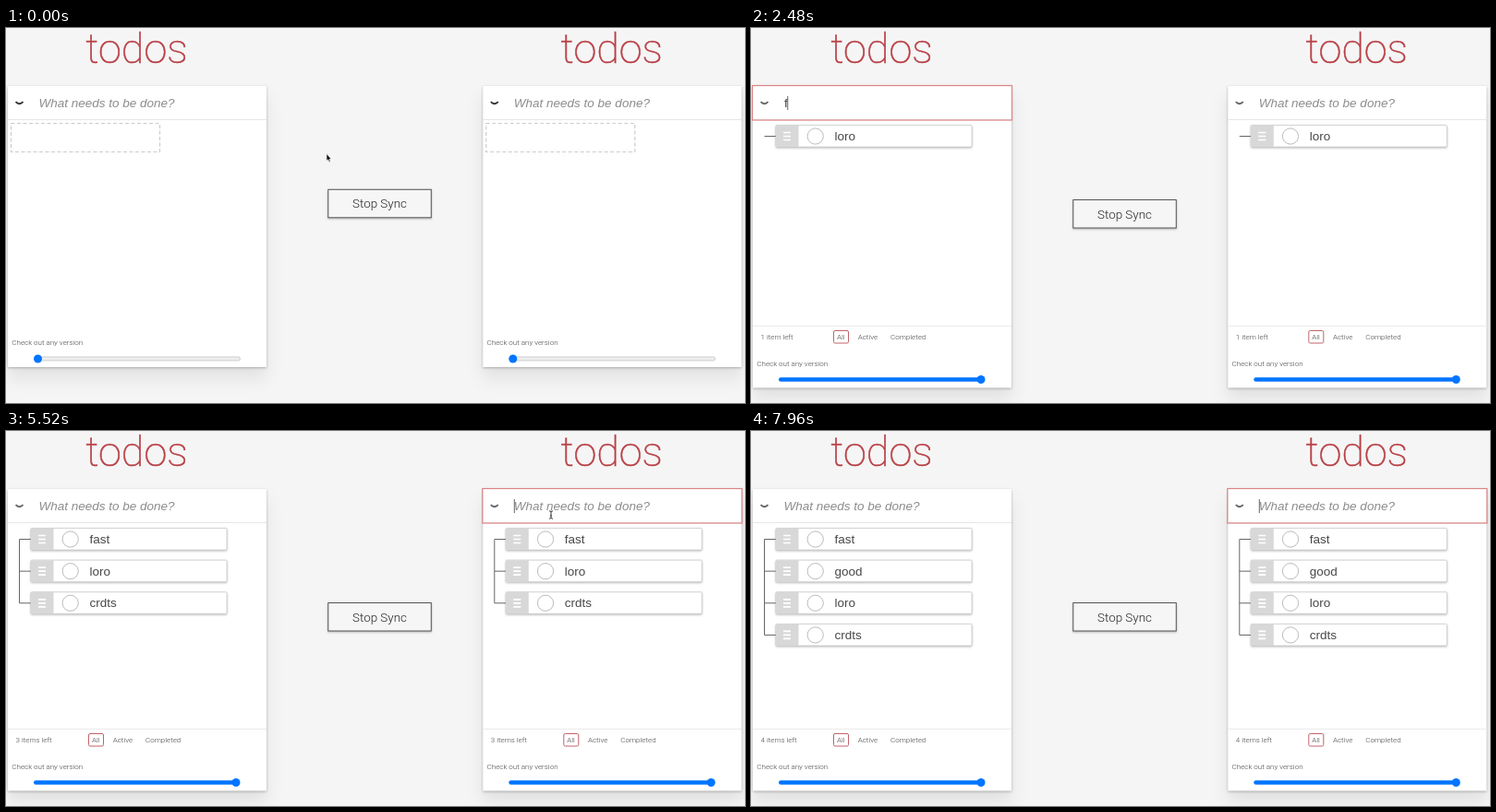
Recreate the animation shown at these times as an HTML page. Size 800 by 407 pixels, loop 8 s.

```html
<!DOCTYPE html>
<html lang="en">
<head>
<meta charset="utf-8">
<title>todos</title>
<style>
  html, body { margin: 0; width: 100%; height: 100%; overflow: hidden; background: #f5f5f5; }
  svg { display: block; width: 800px; height: 407px; }
  text { white-space: pre; }
  .title { font: 100 45px Roboto, sans-serif; fill: #b83f45; stroke: #b83f45; stroke-width: .6; text-anchor: middle; }
  .entry { font: 13.5px "Liberation Sans", sans-serif; fill: #484848; }
  .hint { font: italic 13.5px "Liberation Sans", sans-serif; fill: #8c8c8c; }
  .small { font: 300 8px Roboto, sans-serif; fill: #444; }
  .button { font: 300 13.4px Roboto, sans-serif; fill: #222; text-anchor: middle; }
  .card { fill: #fff; filter: drop-shadow(0 1px 1.5px #0004) drop-shadow(0 12px 9px #00000014); }
  .raised { filter: drop-shadow(0 1.2px 1px #0004); }
</style>
</head>
<body>
<svg id="stage" viewBox="0 0 800 407"></svg>
<script>
const LOOP = 8000, PITCH = 34.65, RIGHT = 514.3;
const stage = document.getElementById('stage');

// Each todo: where it is typed, when its keys fall, when it is added and at which place.
const todos = [
  { word: 'loro',  side: 0, keys: [1440, 1480, 1560, 1640], enter: 1920, at: 0 },
  { word: 'fast',  side: 0, keys: [2480, 2560, 2600, 2760], enter: 2920, at: 0 },
  { word: 'crdts', side: 1, keys: [4720, 4800, 4920, 5000, 5120], enter: 5280, at: 2 },
  { word: 'good',  side: 1, keys: [7080, 7280, 7480, 7680], enter: 7880, at: 1 }
];
const focusTimes = [920, 4000];
const edits = [...focusTimes, ...todos.flatMap(d => [...d.keys, d.enter])];

// Pointer stops: time, x, y
const path = [
  [40, 347, 137], [840, 177, 86], [3600, 178, 86], [4000, 588, 90], [4240, 590, 91],
  [5520, 590, 91], [5880, 612, 89], [6240, 600, 90], [6440, 600, 90], [6800, 580, 91]
];
const hiddenSpans = [[1440, 3600], [4720, 5520], [7080, LOOP]];

const pen = document.createElement('canvas').getContext('2d');
pen.font = '13.5px "Liberation Sans", sans-serif';

const text = (cls, x, y, s) => `<text class="${cls}" x="${x}" y="${y}">${s}</text>`;
const rect = (x, y, w, h, attrs) => `<rect x="${x}" y="${y}" width="${w}" height="${h}" ${attrs}/>`;
const line = (d, color, width = 1) => `<path d="${d}" fill="none" stroke="${color}" stroke-width="${width}"/>`;

function typedText(t, side) {
  const todo = todos.find(d => d.side === side && t >= d.keys[0] && t < d.enter);
  return todo ? todo.word.slice(0, todo.keys.filter(k => k <= t).length) : '';
}

function itemsAt(t, side) {
  const list = [];
  for (const d of todos) {
    const sync = d.side === side ? 0 : 40;
    if (t >= d.enter + sync) list.splice(d.at, 0, d.word);
  }
  return list;
}

function itemRow(word, i) {
  const y = 105.5 + i * PITCH, mid = y + 12;
  const bars = [-4, 0, 4].map(k => `M35 ${mid + k}h8`).join('');
  return line(`M14.5 ${mid}H27`, '#666')
    + rect(27, y, 212, 23.5, 'rx="1" fill="#fff" stroke="#ccc" stroke-width=".8" class="raised"')
    + rect(27, y, 24.5, 23.5, 'rx="1" fill="#d8d8d8"')
    + line(bars, '#fff', 1.7)
    + `<circle cx="69.7" cy="${mid}" r="8.6" fill="#fff" stroke="#aaa" stroke-width=".8"/>`
    + text('entry', 90.5, mid + 4.6, word);
}

function slider(y, full) {
  const knob = full ? 249 : 34.5;
  return rect(30.5, y - 2, 223, 4, 'rx="2" fill="#efefef" stroke="#bbb" stroke-width=".7"').repeat(full ? 0 : 1)
    + (full ? rect(30, y - 2.2, 221, 4.4, 'rx="2.2" fill="#0075ff"') : '')
    + `<circle cx="${knob}" cy="${y}" r="4.5" fill="#0075ff"/>`;
}

function footer(count) {
  return line('M2 323.5H282', '#ebebeb')
    + text('small', 10.5, 338.3, `${count} item${count > 1 ? 's' : ''} left`)
    + rect(89.5, 328.5, 16, 13.5, 'rx="1.5" fill="none" stroke="#c2636a"')
    + text('small', 93, 338.3, 'All')
    + text('small', 115.7, 338.3, 'Active')
    + text('small', 151, 338.3, 'Completed');
}

function panel(t, side) {
  const items = itemsAt(t, side), n = items.length, drop = n ? 22.5 : 0;
  const typed = typedText(t, side);
  const focused = t >= focusTimes[side] && !(side === 0 && t >= focusTimes[1]);
  let out = text('title', 141.5, 38, 'todos')
    + rect(2, 63, 280, 305 + drop, 'class="card"')
    + line('M2 99.5H282', '#e6e6e6')
    + line('M10.5 80.2Q14.5 84.3 18.5 80.2', n ? '#666' : '#333', 1.9)
    + (typed ? text('entry', 36, 86.3, typed) : text('hint', 35.5, 86.3, 'What needs to be done?'));
  if (focused) {
    out += rect(1.5, 62.5, 281, 37.5, 'fill="none" stroke="#db8486" stroke-width="1.2"');
    const last = Math.max(...edits.filter(e => e <= t));
    if ((t - last) % 1000 < 500) {
      out += rect(35.5 + pen.measureText(typed).width, 74, 1, 15, 'fill="#666"');
    }
  }
  if (n) {
    out += line(`M14.5 117.5v${(n - 1) * PITCH}`, '#666') + items.map(itemRow).join('') + footer(n);
  } else {
    out += rect(5.5, 103.5, 161, 31, 'fill="none" stroke="#ccc" stroke-width="1.2" stroke-dasharray="4 2.5"');
  }
  out += text('small', 6.3, 344.3 + drop, 'Check out any version') + slider(359 + drop, n > 0);
  return `<g transform="translate(${side * RIGHT})">${out}</g>`;
}

function syncButton(t) {
  const y = t >= todos[0].enter ? 186.5 : 175.3;
  return rect(348.8, y, 111.5, 30.5, 'fill="#f6f6f6" stroke="#555" class="raised"')
    + text('button', 404.5, y + 20, 'Stop Sync');
}

function pointer(t) {
  if (hiddenSpans.some(([a, b]) => t >= a && t < b)) return '';
  let i = path.findIndex(p => p[0] > t);
  if (i < 0) i = path.length;
  const a = path[Math.max(0, i - 1)], b = path[Math.min(i, path.length - 1)];
  const u = Math.min(1, Math.max(0, (t - a[0]) / (b[0] - a[0] || 1)));
  const ease = u * u * (3 - 2 * u);
  const x = a[1] + (b[1] - a[1]) * ease, y = a[2] + (b[2] - a[2]) * ease;
  const overInput = y > 63 && y < 99 && ((x > 30 && x < 282) || (x > 545 && x < 796));
  const shape = overInput
    ? line('M-2-4.2Q0-4.2 0-3Q0-4.2 2-4.2M0-3V3M-2 4.2Q0 4.2 0 3Q0 4.2 2 4.2M-1 1H1', '#222', .9)
    : '<path d="M0-.5V7.3L1.7 5.8 2.9 8.6 4.2 8 3 5.3H5.2Z" fill="#111" stroke="#fff" stroke-width=".6"/>';
  return `<g transform="translate(${x.toFixed(2)} ${y.toFixed(2)})">${shape}</g>`;
}

let shown = '';
function draw(now) {
  const t = now % LOOP;
  const picture = panel(t, 0) + panel(t, 1) + syncButton(t) + pointer(t);
  if (picture !== shown) stage.innerHTML = shown = picture;
  requestAnimationFrame(draw);
}
const start = performance.now();
draw(0);
function draw0() {}
</script>
</body>
</html>
```
